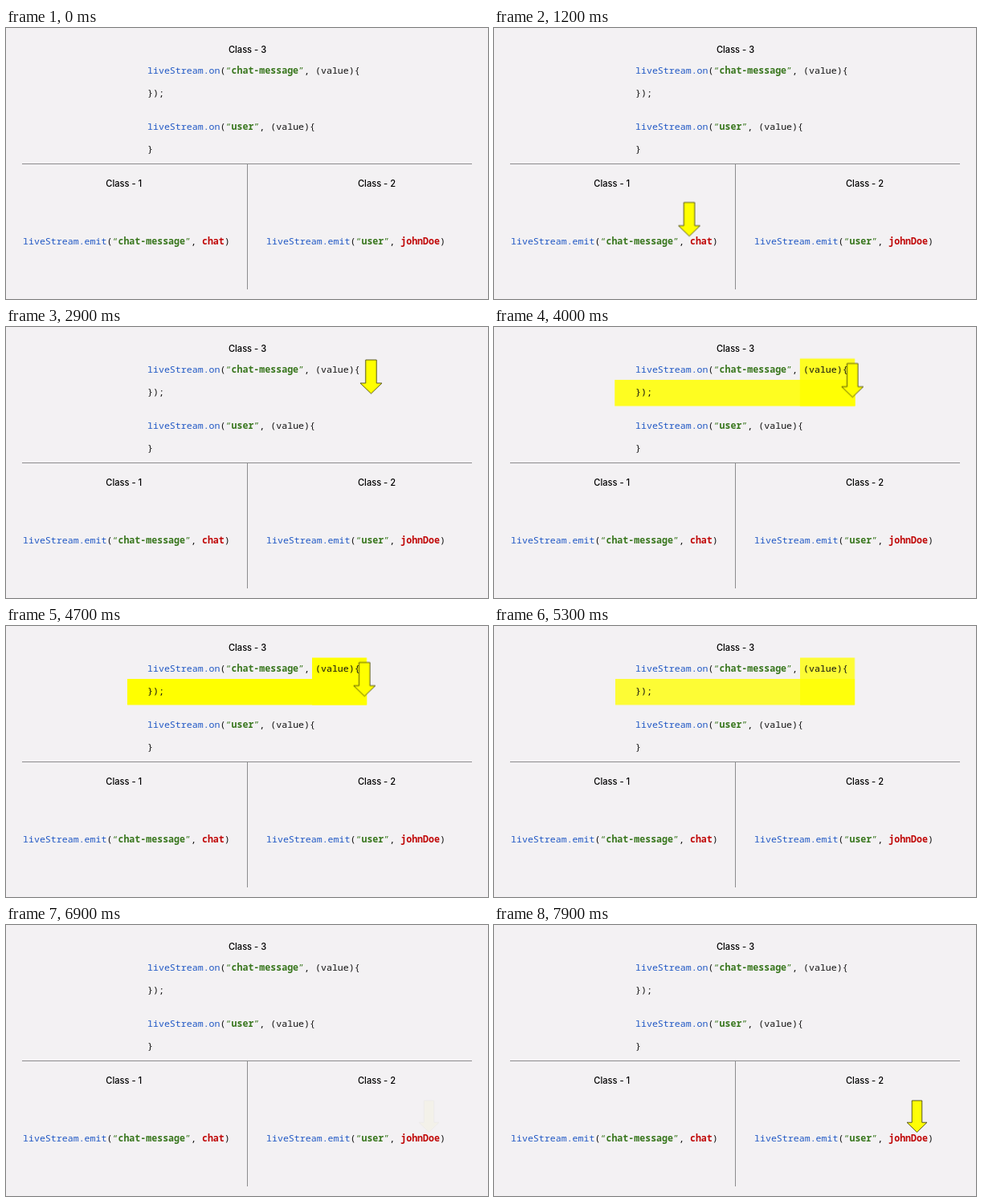
These frames come from a looping animation (600x338 px, 8 s). An HTML page:

```html
<!DOCTYPE html>
<html lang="en">
<head>
<meta charset="utf-8">
<title>Stream events</title>
<style>
  html, body { margin: 0; width: 100%; height: 100%; overflow: hidden; background: #f3f1f3; }
  svg { display: block; width: 600px; height: 338px; }
  text { font: 11.62px "Noto Sans Mono", "DejaVu Sans Mono", monospace; fill: #111; }
  .title { font: 500 11.1px Inter, "Open Sans", sans-serif; text-anchor: middle; fill: #000; }
  .call { fill: #1f57c4; }
  .quote, .event { fill: #38761d; }
  .event, .arg { font-weight: 700; }
  .arg { fill: #c00808; }
  .rule { stroke: #8d8c8e; fill: none; }
  .mark { fill: #ff0; opacity: 0; transform-box: fill-box; transform-origin: center; }
  .arrow { fill: #ff0; stroke: #45450c; stroke-width: .9; opacity: 0; }
</style>
</head>
<body>
<svg viewBox="0 0 600 338">
  <path class="rule" d="M20 169.5H580M300.5 169V326"/>
  <rect class="mark" x="151" y="66" width="298" height="32.5"/>
  <rect class="mark" x="381" y="39.5" width="68" height="59"/>
  <g id="labels"></g>
  <path class="arrow" id="chatArrow"/>
  <path class="arrow" id="userArrow"/>
</svg>
<script>
const LOOP = 8000;
const $ = id => document.getElementById(id);

const span = (cls, s) => `<tspan class="${cls}">${s}</tspan>`;
const line = (x, y, s) => `<text x="${x}" y="${y}">${s}</text>`;
const title = (x, y, s) => `<text class="title" x="${x}" y="${y}">${s}</text>`;
const call = (method, event, rest) =>
  span('call', 'liveStream.' + method) + '(' +
  span('quote', '“') + span('event', event) + span('quote', '”') + ', ' + rest;

$('labels').innerHTML = [
  title(300.5, 30.8, 'Class - 3'),
  title(146.7, 198.3, 'Class - 1'),
  title(461.5, 198.3, 'Class - 2'),
  line(176, 57, call('on', 'chat-message', '(value){')),
  line(176, 85, '});'),
  line(176, 127, call('on', 'user', '(value){')),
  line(176, 154.5, '}'),
  line(21, 270.3, call('emit', 'chat-message', span('arg', 'chat') + ')')),
  line(324, 270.3, call('emit', 'user', span('arg', 'johnDoe') + ')'))
].join('');

// Downward block arrow with its top left corner at the origin
const arrowPath = (w, h) => {
  const neck = h * .69, a = w * .25, b = w * .75;
  return `M${a} 0H${b}V${neck}H${w}L${w / 2} ${h}L0 ${neck}H${a}Z`;
};
$('chatArrow').setAttribute('d', arrowPath(27, 42));
$('userArrow').setAttribute('d', arrowPath(25, 39.5));
$('userArrow').setAttribute('transform', 'translate(514 219)');

const start = document.timeline.currentTime || 0;

// steps: [time in ms, value]; the end values are held
function play(el, prop, steps) {
  const all = [[0, steps[0][1]], ...steps, [LOOP, steps[steps.length - 1][1]]];
  const frames = all.map(([t, v]) => ({ offset: t / LOOP, [prop]: v }));
  el.animate(frames, { duration: LOOP, iterations: Infinity }).startTime = start;
}

// Flight of the first arrow, one point every 100 ms
const flight = [
  [229.5, 217.5], [231, 219.5], [235, 226], [229, 228.5], [212, 223],
  [184, 210], [146, 185], [104, 145], [66, 94], [52, 45], [103, 15],
  [165, 4], [228, 2], [290, 6], [346, 15], [394, 26], [429, 35],
  [441, 41], [434, 43.5], [433, 45], [432.7, 45.5]
];
play($('chatArrow'), 'transform',
  flight.map(([x, y], i) => [1200 + i * 100, `translate(${x}px, ${y}px)`]));
play($('chatArrow'), 'opacity', [[330, 0], [1200, 1], [4715, 1], [5200, 0]]);
play($('userArrow'), 'opacity', [[6860, 0], [7930, 1]]);

for (const mark of document.querySelectorAll('.mark')) {
  play(mark, 'opacity', [
    [3965, 0], [3965, 1], [4100, .5], [4550, .5], [4690, 1],
    [5190, 1], [5710, 0]
  ]);
  play(mark, 'transform', [[3965, 'scale(1)'], [4328, 'scale(1.05)'], [4690, 'scale(1)']]);
}
</script>
</body>
</html>
```
